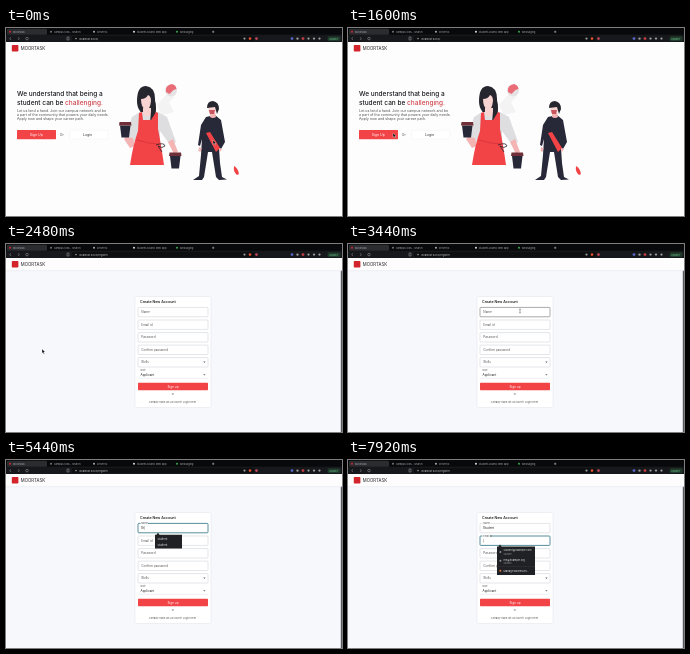
An HTML page that plays this animation: 336x188 px, repeating every 8000 ms.

```html
<!DOCTYPE html>
<html lang="en">
<head>
<meta charset="utf-8">
<style>
html, body { margin: 0; width: 100%; height: 100%; overflow: hidden; background: #fff; }
svg { display: block; width: 100%; height: 100%; font-family: Inter, Roboto, sans-serif; }
.small { font-size: 3.1px; fill: #555; }
.tab { font-size: 2.6px; fill: #a9abb0; }
.mid { text-anchor: middle; }
.box { fill: #fff; stroke: #c9cbd0; stroke-width: .5; }
.red { fill: #f24347; }
.dark { fill: #25262e; }
.navy { fill: #272838; }
.skin { fill: #f3b4b3; }
.face { fill: #f7d3d1; }
.pale { fill: #dedee1; }
</style>
</head>
<body>
<svg viewBox="0 0 336 188" preserveAspectRatio="none">
  <rect id="paper" width="336" height="188" fill="#fdfdfd"/>

  <g id="home">
    <g font-size="6.5" font-weight="500" fill="#17181c">
      <text x="11" y="68">We understand that being a</text>
      <text x="11" y="76.7">student can be <tspan fill="#d0444c">challenging.</tspan></text>
    </g>
    <g font-size="3.6" fill="#555">
      <text x="11" y="84.4">Let us lend a hand. Join our campus network and be</text>
      <text x="11" y="88.3">a part of the community that powers your daily needs.</text>
      <text x="11" y="92.2">Apply now and shape your career path.</text>
    </g>
    <rect class="red" x="11" y="102" width="39" height="9.2" rx=".6"/>
    <rect class="box" x="63.5" y="102.2" width="38.5" height="8.8" rx=".6" style="stroke:#f0f0f1"/>
    <g class="mid" font-size="3.5">
      <text x="30.3" y="107.8" fill="#fff">Sign Up</text>
      <text x="55.8" y="107.8" fill="#555">Or</text>
      <text x="81.6" y="107.8" fill="#333">Login</text>
    </g>

    <!-- figure in the background -->
    <path d="M160 67l9 2-6 5 5 10-12 3-5-10z" fill="#f3f3f4"/>
    <circle cx="165" cy="62.5" r="6" fill="#e6e3e5"/>
    <path d="M160 64q-1-7 6-8q4 1 4.500 5l-3 1-4 4z" fill="#ea6c77"/>

    <!-- figure with the apron -->
    <path class="dark" d="M131 73q0-15 9-15q9 1 9 13l1 24q-6 3-10 0l-6-12q-3-4-3-10z"/>
    <path class="pale" d="M134 84l-8 5-7 22 7 7 6-10 0 8h22l0-13 11 15 5-4-9-25-9-5z"/>
    <path class="face" d="M137 80l8 0 2 6q-5 5-10 0zM135 71q5 0 7-4q3 1 3 6q-1 9-5 9q-5-2-5-11z"/>
    <path class="dark" d="M145 66q5 5 5 14l-1 16-5-1 1-12z"/>
    <path class="skin" d="M120 109l7 1 2 8-5 2-6-9zM162 114l5-3 5 13-4 2z"/>
    <path class="red" d="M133 85l3-1 1 8 8 0 5-8 2 1 0 16q3 15 6 36h-34q3-20 8-34z"/>
    <path d="M131 112q12 4 22 4" fill="none" stroke="#c92d36" stroke-width=".6"/>
    <path d="M150 117q8-3 9 1q-3 3-7 0l4 6" fill="none" stroke="#25262e" stroke-width=".8"/>
    <path class="navy" d="M114 97.500h10.500l-1.500 12h-7.500zM164 128h10.500l-1.500 12.500h-7.500z"/>
    <path d="M113.500 94h11.500l.5 3.500h-12.500zM163.500 124.500h11.500l.5 3.500h-12.500z" fill="#713039"/>

    <!-- figure with the sash -->
    <path class="navy" d="M200 89l9-2 6 5 4 22-4 7-2-1 1 15 2 14 5 2.500-8 .5-3-3-4-25-4 0-4 25-2 3h-9l6-4 2-21 1-16-2 7-2-1 3-20z"/>
    <path class="skin" d="M193 119l2.500 1-1 4-2-1zM214 120l2 1-2 3-1-1zM204 84l5 0 1 5q-3 2-6 0z"/>
    <path class="face" d="M202 78h8v5q-3 5-7 2z"/>
    <path class="dark" d="M201 80q0-7 6-7q6 1 6 8l-2 5-2-7z"/>
    <path d="M203 82l6 0-1 4-4 0z" fill="#c9555e"/>
    <path class="red" d="M200 105l4-1 10 16-4 4zM228 138q4 2 5 8l-2 1q-4-3-3-9z"/>
  </g>

  <g id="signup">
    <rect x="129" y="52.5" width="76" height="111" rx="1.5" fill="#fff" stroke="#dfe2e8" stroke-width=".5"/>
    <text x="134" y="59.2" font-size="3.6" font-weight="600" fill="#222">Create New Account</text>
    <g id="fields"></g>
    <text class="small" x="134.5" y="127" style="font-size:2.4px">Role</text>
    <text class="small" x="134.5" y="132" style="fill:#222">Applicant</text>
    <path d="M132 134.3h70" stroke="#d5d7dc" stroke-width=".4"/>
    <path d="M197.2 117.6h2.4l-1.2 1.3zM197.2 130.3h2.4l-1.2 1.3z" fill="#666"/>
    <rect class="red" x="132" y="138.8" width="70" height="7.4" rx=".8"/>
    <g class="mid">
      <text class="small" x="167" y="143.6" style="fill:#fff">Sign up</text>
      <text class="small" x="167" y="151" style="font-size:2.4px">or</text>
      <text class="small" x="166.5" y="159" style="font-size:2.7px">Already have an Account? Login here</text>
    </g>
    <g id="nameMenu">
      <path d="M150.5 74.8l1.5-2 1.5 2H176v13.7h-27V74.8z" fill="#202124"/>
      <g font-size="2.8" fill="#e2e3e6"><text x="151.5" y="79.5">student</text><text x="151.5" y="86">student</text></g>
    </g>
    <g id="mailMenu">
      <path d="M150.5 86.5l1.5-2 1.5 2H187v28.5h-38V86.5z" fill="#202124"/>
      <g font-size="2.6" fill="#e2e3e6">
        <text x="155.5" y="91.4">student@example.com</text><text x="155.5" y="100.6">me@example.org</text>
        <g fill="#999" font-size="2.2"><text x="155.5" y="94.8">Student</text><text x="155.5" y="104">Student</text></g>
        <text x="155.5" y="111.6">Manage addresses...</text>
      </g>
      <path d="M149 106.5h38" stroke="#44464b" stroke-width=".3"/>
      <g fill="#8a9099"><circle cx="152.4" cy="92" r="1"/><circle cx="152.4" cy="100.8" r="1"/></g>
      <circle cx="152.4" cy="110.8" r="1" fill="#e8713c"/>
    </g>
    <rect x="334.8" y="14" width="1.2" height="174" fill="#55585e"/>
  </g>

  <g id="header">
    <path d="M0 14h336v12.6H0z" fill="#fdfdfd"/>
    <path id="rule" d="M0 26.7h336" stroke="#e3e5ea" stroke-width=".5"/>
    <rect class="red" x="5.8" y="17" width="6.6" height="6.6" rx=".8" style="fill:#d3242b"/>
    <text x="14.8" y="22" font-size="4.3" fill="#222">MOORTASK</text>
  </g>

  <g id="browser">
    <rect width="336" height="14" fill="#17181b"/>
    <rect width="336" height="6.6" fill="#08090a"/>
    <rect x="1" y=".8" width="40" height="6" rx="1.2" fill="#2a2c30"/>
    <g class="tab" id="tabs"></g>
    <path d="M206 3.8h2.400M207.200 2.600v2.400" stroke="#ccc" stroke-width=".5"/>
    <rect x="66" y="8" width="182" height="5" rx="1.5" fill="#0e0f11"/>
    <path d="M5 9.3l-1.4 1.3 1.4 1.3M12 9.3l1.4 1.3-1.4 1.3M63 9h-2v3h2z" fill="none" stroke="#a0a2a6" stroke-width=".5"/>
    <circle cx="21" cy="10.6" r="1.3" fill="none" stroke="#a0a2a6" stroke-width=".5"/>
    <text id="address" class="tab" x="73" y="11.5" style="fill:#c8cacd"></text>
    <circle cx="70" cy="10.6" r=".8" fill="#999"/>
    <circle cx="238.5" cy="10.6" r="1.1" fill="#999"/>
    <circle cx="244" cy="10.6" r="1.3" fill="#e2502e"/>
    <circle cx="250.5" cy="10.6" r="1.3" fill="#c8485a"/>
    <circle cx="286" cy="10.6" r="1.4" fill="#5865c8"/>
    <circle cx="291.5" cy="10.6" r="1.2" fill="#999"/>
    <circle cx="297" cy="10.6" r="1.4" fill="#c33c42"/>
    <g fill="#a0a2a6"><circle cx="302.500" cy="10.6" r="1.1"/><circle cx="308" cy="10.6" r="1.1"/><circle cx="313.500" cy="10.6" r="1.1"/></g>
    <rect x="321.5" y="8.3" width="13" height="4.6" rx="1.5" fill="#1f3a2a"/>
    <text class="tab" x="323" y="11.6" style="fill:#6fc08b">Update</text>
  </g>

  <path id="arrow" d="M0 0v4.3l1-.9.8 1.7.7-.3-.8-1.7h1.4z" fill="#111" stroke="#fff" stroke-width=".3"/>
  <path id="beam" d="M-.8-1.8h1.6M0-1.8v3.6M-.8 1.8h1.6" fill="none" stroke="#222" stroke-width=".4"/>
</svg>
<script>
const $ = id => document.getElementById(id);
const show = (id, on) => $(id).style.display = on ? '' : 'none';

const tabs = [[7, 'Moortask'], [48, 'campus jobs - search'], [91, 'server.js'], [131, 'student-board: web app'], [174, 'Messaging']];
$('tabs').innerHTML = tabs.map(([x, label], i) =>
  `<circle cx="${x - 3}" cy="3.8" r="1" fill="${['#d3242b', '#777', '#aaa', '#ddd', '#35a853'][i]}"/><text x="${x}" y="4.7">${label}</text>`).join('');

const pageTime = 2480, nameTime = 3680, mailTime = 7680;
const keyTimes = [5120, 5360, 5680, 6000, 6240, 6480, 6720];
const labels = ['Name', 'Email id', 'Password', 'Confirm password', 'Skills'];
const tops = [63.4, 76, 88.6, 101.1, 113.6];

const ease = (t, from, to) => {
  const p = Math.min(1, Math.max(0, (t - from) / (to - from)));
  return p * p * (3 - 2 * p);
};

// The label rests inside the field and floats onto its border as "lift" goes from 0 to 1.
function field(i, { value = '', lift = 0, focused, hovered, caret }) {
  const y = tops[i];
  const stroke = focused ? '#2c7180' : hovered ? '#555' : '#c9cbd0';
  return `<rect class="box" x="132" y="${y}" width="70" height="9.4" rx=".8" style="stroke:${stroke};stroke-width:${focused ? .8 : .5}"/>
    <rect x="134.5" y="${y - 1}" width="${7.5 * lift}" height="2" fill="#fff"/>
    <text class="small" x="135.3" y="${y + 5.7 - 5 * lift}" style="font-size:${3.1 - .7 * lift}px">${labels[i]}</text>
    <text class="small" x="135" y="${y + 5.9}" style="fill:#222">${value}${focused && caret ? '|' : ''}</text>`;
}

// Time, x, y
const path = [[0, 207, 112], [160, 207, 117], [320, 207, 117], [560, 206, 142], [960, 206, 142],
  [1600, 45, 105], [2400, 36, 105], [2720, 36, 105], [3280, 172, 67], [7120, 172, 67], [7680, 168, 81]];
function pointer(t) {
  const i = Math.max(1, path.findIndex(p => p[0] > t));
  if (t >= mailTime) return path.at(-1).slice(1);
  const [t0, x0, y0] = path[i - 1], [t1, x1, y1] = path[i], p = ease(t, t0, t1);
  return [x0 + (x1 - x0) * p, y0 + (y1 - y0) * p];
}

function draw() {
  const t = Math.floor(performance.now() % 8000 / 80) * 80;
  const form = t >= pageTime, inMail = t >= mailTime, inName = t >= nameTime && !inMail;
  const typed = 'Student'.slice(0, keyTimes.filter(k => k <= t).length);
  const lastInput = Math.max(...[nameTime, ...keyTimes, mailTime].filter(k => k <= t), 0);
  const caret = (t - lastInput) % 1000 < 500;

  show('home', !form);
  show('signup', form);
  show('rule', form);
  $('paper').setAttribute('fill', form ? '#f7f8fc' : '#fdfdfd');
  $('address').textContent = 'localhost:3000/' + (form ? 'register' : '');
  const states = [
    { value: typed, lift: ease(t, nameTime - 80, nameTime + 160), focused: inName, hovered: t >= 3200 && !inMail, caret },
    { lift: ease(t, mailTime - 80, mailTime + 160), focused: inMail, caret }
  ];
  $('fields').innerHTML = labels.map((_, i) => field(i, states[i] || {})).join('');
  show('nameMenu', inName && typed);
  show('mailMenu', t >= mailTime + 160);

  const [x, y] = pointer(t), overField = t >= 3200;
  for (const id of ['arrow', 'beam']) $(id).setAttribute('transform', `translate(${x} ${y})`);
  show('arrow', !overField);
  show('beam', overField && (!typed || t >= 7120 && t < mailTime + 160));
  requestAnimationFrame(draw);
}
draw();
</script>
</body>
</html>
```
